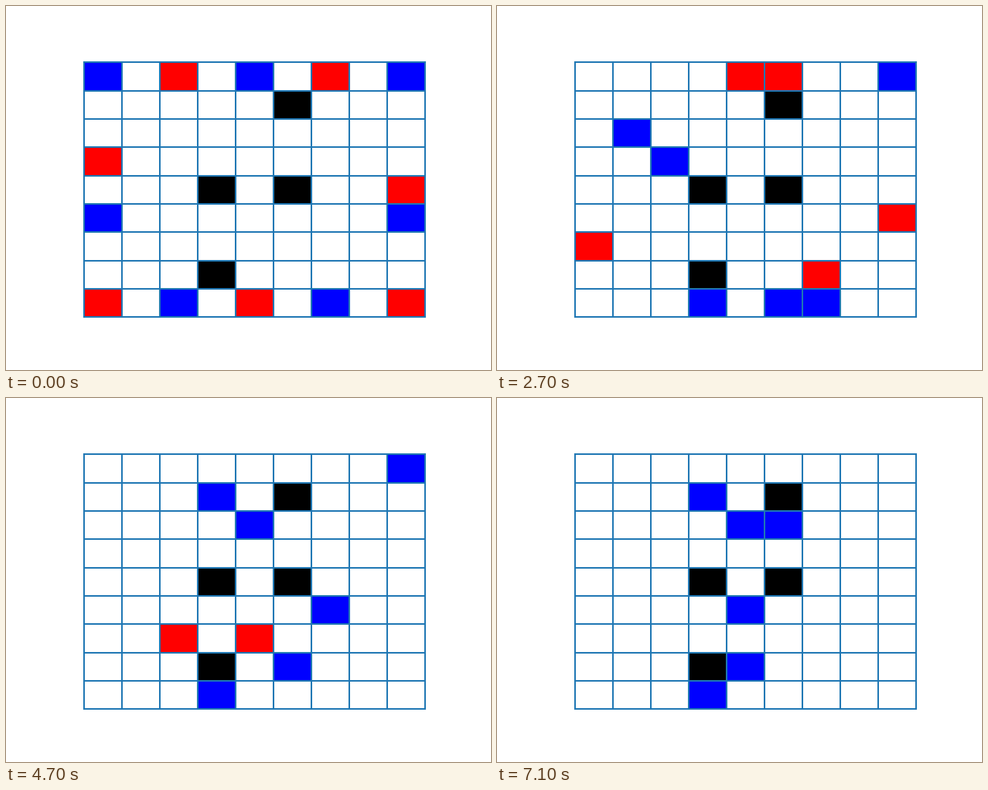
A matplotlib script for the animation above (7200 ms loop, 640 by 480 pixels).

```python
import matplotlib.pyplot as plt
from matplotlib.animation import FuncAnimation
from matplotlib.patches import Rectangle

SIZE = 9
FRAMES = 72
WALLS = [(1, 5), (4, 3), (4, 5), (7, 3)]
START = {
    "blue": [(0, 0), (0, 4), (0, 8), (5, 0), (5, 8), (8, 2), (8, 6)],
    "red": [(0, 2), (0, 6), (3, 0), (4, 8), (8, 0), (8, 4), (8, 8)],
}
STEP = {"U": (-1, 0), "D": (1, 0), "L": (0, -1), "R": (0, 1)}

# Each side's play: start row, start column, steps (one per turn).
PLAY = {
    "blue": [
        (8, 2, "R"), (8, 6, "L"), (5, 0, "U"), (5, 8, "DDLDL"),
        (0, 0, "DDR"), (4, 0, "URRRRU"), (2, 1, "RRU"), (8, 5, "U"),
        (8, 6, "UUUDUL"), (5, 5, "R"), (7, 5, "L"), (0, 8, "LL"),
        (5, 6, "L"), (0, 6, "DDL"), (5, 5, "L"),
    ],
    "red": [
        (8, 8, "LL"), (4, 8, "LR"), (0, 6, "L"), (8, 6, "U"),
        (8, 0, "U"), (3, 0, "RL"), (4, 8, "D"), (7, 0, "U"),
        (0, 2, "RRD"), (6, 0, "RR"), (0, 5, "L"), (5, 8, "LL"),
        (0, 4, "D"), (5, 6, "LLDD"), (6, 2, "RL"), (7, 4, "D"),
        (6, 2, "UDRRRLRL"),
    ],
}


def moves(side):
    """Yield (from, to) for every turn of one side."""
    for row, col, steps in PLAY[side]:
        for step in steps:
            dr, dc = STEP[step]
            yield (row, col), (row + dr, col + dc)
            row, col = row + dr, col + dc


def captured(board, cell):
    """A piece is taken when two or more enemies touch it."""
    row, col = cell
    near = [board.get((row + dr, col + dc)) for dr, dc in STEP.values()]
    enemy = "red" if board[cell] == "blue" else "blue"
    return near.count(enemy) >= 2


def play_game():
    board = {cell: side for side, cells in START.items() for cell in cells}
    boards = [dict(board)]
    turns = {side: moves(side) for side in PLAY}
    for turn in range(1, FRAMES):
        old, new = next(turns["blue" if turn % 2 else "red"])
        board[new] = board.pop(old)
        taken = [cell for cell in board if captured(board, cell)]
        for cell in taken:
            # The surrounding pieces stay unless they are taken themselves.
            del board[cell]
        boards.append(dict(board))
    return boards


boards = play_game()

fig, ax = plt.subplots(figsize=(6.4, 4.8), dpi=100)
fig.subplots_adjust(left=0.125, right=0.9, bottom=0.11, top=0.88)
ax.axis("off")

cells = {}
for row in range(SIZE):
    for col in range(SIZE):
        color = "black" if (row, col) in WALLS else "white"
        cells[row, col] = ax.add_patch(
            Rectangle((col, row), 1, 1, facecolor=color, linewidth=0))

for i in range(SIZE + 1):
    ax.plot([0, SIZE], [i, i], color="C0", linewidth=1.5)
    ax.plot([i, i], [0, SIZE], color="C0", linewidth=1.5)

pad = SIZE * 0.05
ax.set_xlim(-pad, SIZE + pad)
ax.set_ylim(SIZE + pad, -pad)


def update(frame):
    for cell, patch in cells.items():
        if cell not in WALLS:
            patch.set_facecolor(boards[frame].get(cell, "white"))
    return list(cells.values())


anim = FuncAnimation(fig, update, frames=FRAMES, interval=100,
                     repeat=True, repeat_delay=0)
plt.show()
```
